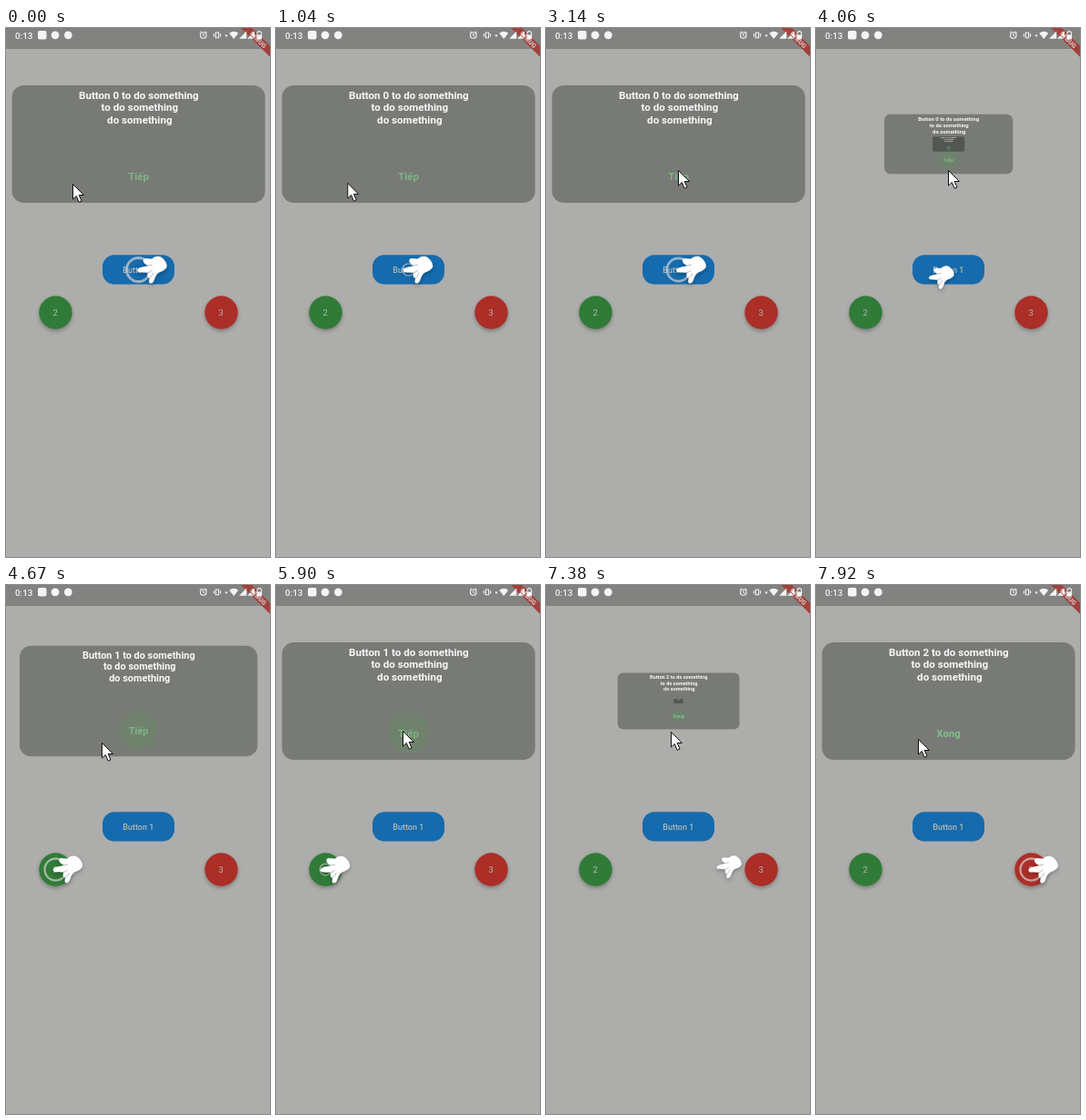
Recreate the animation shown at these times as an HTML page with a canvas. Size 290 by 581 pixels, loop 8000 ms.

```html
<!DOCTYPE html>
<html lang="vi">
<head>
<meta charset="utf-8">
<title>Button tutorial</title>
<style>
  html, body { margin: 0; width: 100%; height: 100%; overflow: hidden; background: #adadab; }
  canvas { display: block; width: 290px; height: 581px; }
</style>
</head>
<body>
<canvas id="stage"></canvas>
<script>
const W = 290, H = 581, LOOP = 8000;
const FONT = 'Roboto, sans-serif';
const canvas = document.getElementById('stage');
const ctx = canvas.getContext('2d');
const dpr = window.devicePixelRatio || 1;
canvas.width = W * dpr;
canvas.height = H * dpr;

const STEPS = [
  { x: 145.5, y: 265.5, label: 'Tiếp' },
  { x: 54.5, y: 312.5, label: 'Tiếp' },
  { x: 236.5, y: 312.5, label: 'Xong' }
];
const MOVES = [3966, 7020];     // starts of the step changes
const MOVE_TIME = 750;
const TAP = 1625;
const PRESS = 3700;             // first press on the panel's link
const CURSOR = [
  [0, 73, 171], [900, 73, 171], [1750, 145, 156], [4080, 145, 156],
  [4550, 105, 173], [4850, 105, 173], [5500, 139, 160], [7000, 139, 160],
  [7380, 137, 161], [7800, 112, 169], [8000, 112, 169]
];

const clamp = v => Math.max(0, Math.min(1, v));
const mix = (a, b, k) => a + (b - a) * k;
const smooth = k => k * k * (3 - 2 * k);

function fillBox(x, y, w, h, r, color) {
  ctx.fillStyle = color;
  ctx.beginPath();
  ctx.roundRect(x, y, w, h, r);
  ctx.fill();
}

function disc(x, y, r, color) {
  ctx.fillStyle = color;
  ctx.beginPath();
  ctx.arc(x, y, r, 0, Math.PI * 2);
  ctx.fill();
}

function ring(x, y, r, width, color) {
  ctx.strokeStyle = color;
  ctx.lineWidth = width;
  ctx.beginPath();
  ctx.arc(x, y, r, 0, Math.PI * 2);
  ctx.stroke();
}

function text(str, x, y, size, color, weight = 400, align = 'center') {
  ctx.font = `${weight} ${size}px ${FONT}`;
  ctx.textAlign = align;
  ctx.textBaseline = 'alphabetic';
  ctx.fillStyle = color;
  ctx.fillText(str, x, y);
}

function shape(d, fill, stroke, width = 1) {
  const p = new Path2D(d);
  if (fill) {
    ctx.fillStyle = fill;
    ctx.fill(p);
  }
  if (stroke) {
    ctx.strokeStyle = stroke;
    ctx.lineWidth = width;
    ctx.stroke(p);
  }
}

function withShadow(draw, alpha) {
  ctx.save();
  ctx.shadowColor = `rgba(0,0,0,${alpha})`;
  ctx.shadowBlur = 4.5 * dpr;
  ctx.shadowOffsetY = 2.2 * dpr;
  draw();
  ctx.restore();
}

function drawBanner() {
  ctx.save();
  ctx.translate(W, 0);
  ctx.rotate(Math.PI / 4);
  ctx.fillStyle = '#a2403b';
  ctx.fillRect(-30, 14, 60, 8.5);
  text('DEBUG', 0, 20.9, 7, '#d2c2c0', 900);
  ctx.restore();
}

function drawStatusBar() {
  ctx.fillStyle = '#828281';
  ctx.fillRect(0, 0, W, 23);
  drawBanner();
  const white = '#f4f4f4';
  text('0:13', 10, 11.5, 9.8, white, 500, 'left');
  fillBox(35, 3, 9.5, 9.5, 2, white);
  disc(54, 7.8, 4.4, white);
  disc(68.3, 7.8, 4.4, white);

  ring(216.8, 8, 3.3, 1.1, white);
  shape('M216.8 6V8.3L218.3 9M212.8 5.4L214.8 3.7M220.8 5.4L218.8 3.7', null, white);
  shape('M230.4 5H233.6V10.8H230.4ZM228.4 6.2V9.6M235.6 6.2V9.6', null, white, 1.1);
  shape('M240.3 7.6H243.8L242 10Z', white);
  shape('M245.2 5.8Q250.2 1.8 255.2 5.8L250.2 12Z', white);
  shape('M264.2 3.5V11.8H256.2Z', white);
  shape('M273 3.5V11.8H265.2Z', white);
  shape('M265.5 4L273 12', null, '#a2403b', 1);
  shape('M276 4.5H277.2V3.4H279.2V4.5H280.6V12H276Z', null, white, 1);
  ctx.fillStyle = white;
  ctx.fillRect(276, 7.5, 4.6, 4.5);
}

function drawButtons() {
  const label = '#b4b8b6';
  fillBox(106, 249.2, 79, 32.4, 13, '#156bad');
  text('Button 1', 145.3, 268.9, 9, label, 500);
  withShadow(() => disc(54.5, 312.5, 18.2, '#307b37'), 0.28);
  withShadow(() => disc(236.5, 312.5, 18.2, '#ab2e27'), 0.28);
  text('2', 54.2, 316, 9.5, label);
  text('3', 236.2, 316, 9.5, label);
}

function drawPanel(step, scale, t) {
  if (scale < 0.02) return;
  const last = step === 2;
  ctx.save();
  ctx.translate(145.6, 127.5);
  ctx.scale(scale, scale);
  fillBox(-139, -64.5, 278, 129, 13, 'rgba(0,9,0,.31)');
  const lines = [`Button ${step} to do something`, 'to do something', 'do something'];
  lines.forEach((line, i) => text(line, i ? 1.2 : 0.2, -50 + i * 13.5, 11.6, '#f7f7f7', 700));
  if (t > PRESS) {
    const fade = last ? 1 - clamp((t - MOVES[1] - 380) / 400) : 1;
    disc(0, 34.5, last ? 15 : 23, `rgba(90,150,90,${0.28 * fade})`);
  }
  text(STEPS[step].label, 0, 39, 11.4, last ? '#80c088' : '#80b485', 700);
  ctx.restore();
}

function drawHand(x, y, scale) {
  ctx.save();
  ctx.translate(x, y);
  ctx.scale(scale, scale);
  ctx.lineJoin = ctx.lineCap = 'round';
  withShadow(() => shape(
    'M0 .5C0 -2 4 -2.5 12 -4.5C8 -6 5.5 -9 7 -11.5C9 -13.5 13 -11.5 16 -12' +
    'C18 -14 21 -15.5 25 -14.5C30 -12 33 -7 32.5 -3C31 0 28 1.5 25 2.5' +
    'C22 4 20.5 6 19.5 9C18.5 12 17.5 15 14.5 15C12 14.5 13 11 13.5 9' +
    'C11 9.5 10.5 6.5 11.5 3.2L3 2.8C1 2.8 0 2 0 .5Z', '#fff'), 0.25);
  shape('M12 -4.5L16 -5.5M11.5 3.2Q14.5 3 16 .5M13.5 9Q16.5 7 17.5 4', null, '#888', 0.6);
  ctx.restore();
}

function drawCursor(t) {
  let i = 1;
  while (i < CURSOR.length - 1 && CURSOR[i][0] < t) i++;
  const [t0, x0, y0] = CURSOR[i - 1], [t1, x1, y1] = CURSOR[i];
  const k = smooth(clamp((t - t0) / (t1 - t0)));
  ctx.save();
  ctx.translate(mix(x0, x1, k), mix(y0, y1, k));
  shape('M.5 .5V17L4.3 13.5L7.2 20.3L10 19L7.2 12.5H12.4Z', '#fff', '#111', 1);
  ctx.restore();
}

function draw(t) {
  ctx.setTransform(dpr, 0, 0, dpr, 0, 0);
  ctx.fillStyle = '#adadab';
  ctx.fillRect(0, 0, W, H);
  drawStatusBar();

  const m = t < MOVES[1] ? 0 : 1;
  const p = clamp((t - MOVES[m]) / MOVE_TIME);
  // The old panel collapses quickly while the new one grows over it.
  drawPanel(m, (1 - p) ** 5, t);
  drawPanel(m + 1, p, t);
  drawButtons();

  const from = STEPS[m], to = STEPS[m + 1];
  const go = 1 - (1 - p) ** 2;
  const arc = Math.sin(Math.PI * go);
  const resting = p === 0 || go > 0.98;
  const phase = (t / TAP + 0.48) % 1;
  const x = mix(from.x, to.x, go), y = mix(from.y, to.y, go) - 4 * arc;
  if (phase < 0.5 && resting) {
    const r = 4 + 10 * Math.sin(Math.PI * phase);
    const target = p ? to : from;
    ring(target.x, target.y, r - 1, 0.8 + 4.4 * phase, 'rgba(210,210,210,.7)');
  }
  const sway = resting ? -3.2 - 2.6 * Math.cos(2 * Math.PI * (phase - 0.1)) : 0;
  drawHand(x + sway, y, 1 - 0.22 * arc);
  drawCursor(t);
}

function tick() {
  draw(performance.now() % LOOP);
  requestAnimationFrame(tick);
}
tick();
</script>
</body>
</html>
```
